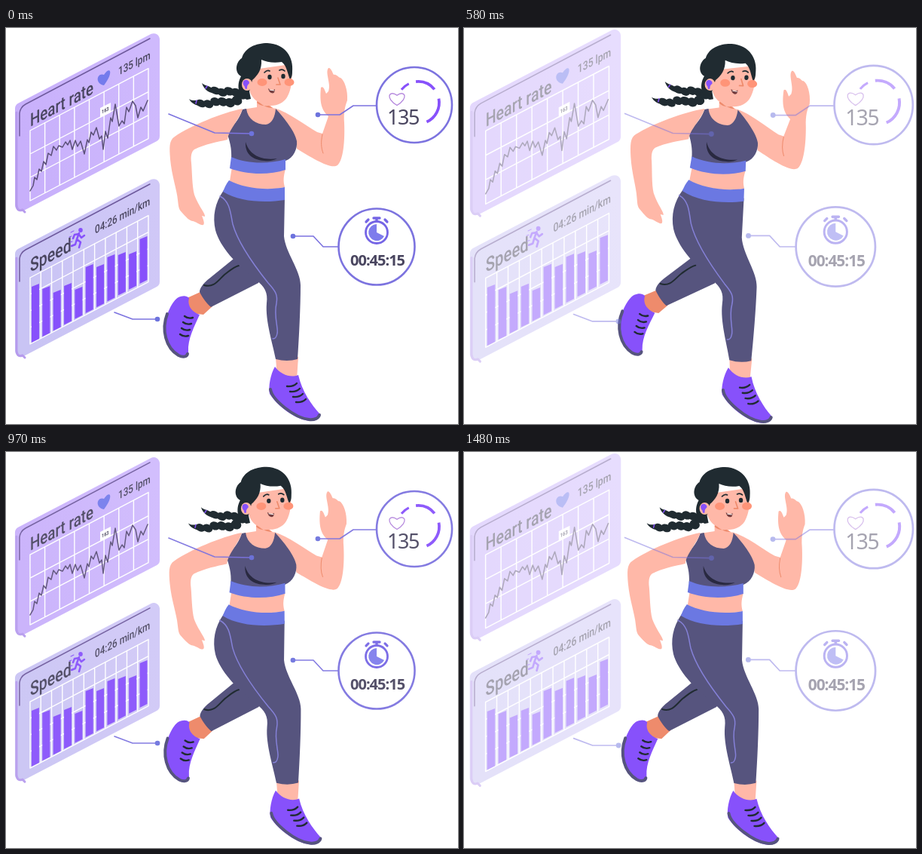
Write an HTML page with a canvas that moves like this. It is 600 px wide and 525 px high and loops after 1510 ms.

```html
<!DOCTYPE html>
<html lang="en">
<head>
<meta charset="utf-8">
<title>Runner with fitness readouts</title>
<style>
html, body { margin: 0; width: 100%; height: 100%; overflow: hidden; background: #fff; }
canvas { display: block; width: 600px; height: 525px; }
</style>
</head>
<body>
<canvas id="stage" width="600" height="525"></canvas>
<script>
const LOOP = 1510, STEP = 30, PULSE = 1000;
const SKIN = '#ffb8a8', SHADE = '#ee8b6c', CLOTH = '#56547e', BLUE = '#6b78e2',
      VIOLET = '#8751fb', HAIR = '#202b31', INK = '#49455f', LINE = '#7c73df';

const stage = document.getElementById('stage').getContext('2d');
const layer = document.createElement('canvas');
layer.width = 600;
layer.height = 525;
const overlay = layer.getContext('2d');
let g = stage;

// [time, value] pairs joined by smooth curves
const LEAN = [[-280, -.033], [0, 0], [150, .02], [390, .035], [480, .036], [700, .027],
  [970, -.007], [1120, -.026], [1230, -.033], [1480, -.001], [1660, .02]];
const FADE = [[0, 1], [150, .61], [390, .5], [500, .48], [700, .54], [970, .95],
  [1000, .97], [1120, .73], [1250, .56], [1510, .48]];

function track(keys, t) {
  let i = 0;
  while (i < keys.length - 2 && t >= keys[i + 1][0]) i++;
  const [t0, a] = keys[i], [t1, b] = keys[i + 1], span = t1 - t0;
  const slope = k => {
    const p = keys[Math.max(k - 1, 0)], q = keys[Math.min(k + 1, keys.length - 1)];
    return (q[1] - p[1]) / (q[0] - p[0]) * span;
  };
  const u = (t - t0) / span, v = 1 - u;
  return a * v * v * (1 + 2 * u) + b * u * u * (3 - 2 * u)
    + slope(i) * u * v * v - slope(i + 1) * u * u * v;
}

function fill(d, color) {
  g.fillStyle = color;
  g.fill(new Path2D(d));
}

function stroke(d, color, width = 2) {
  g.strokeStyle = color;
  g.lineWidth = width;
  g.lineCap = g.lineJoin = 'round';
  g.stroke(new Path2D(d));
}

function oval(x, y, rx, ry, color, turn = 0) {
  g.fillStyle = color;
  g.beginPath();
  g.ellipse(x, y, rx, ry, turn, 0, 7);
  g.fill();
}

function arc(x, y, r, from, to, color, width) {
  const rad = Math.PI / 180;
  g.strokeStyle = color;
  g.lineWidth = width;
  g.beginPath();
  g.arc(x, y, r, from * rad, to * rad);
  g.stroke();
}

function text(label, x, y, font, color = INK, spacing = 0) {
  g.font = font;
  g.letterSpacing = spacing + 'px';
  g.fillStyle = color;
  g.fillText(label, x, y);
}

// Draws in the tilted plane of a panel, with its origin at x, y
function tilted(x, y, draw) {
  g.save();
  g.transform(.78, -.41, 0, 1, x, y);
  draw();
  g.restore();
}

function scaled(x, y, s, draw) {
  g.save();
  g.translate(x, y);
  g.scale(s, s);
  g.translate(-x, -y);
  draw();
  g.restore();
}

function backLeg() {
  fill('M258 350L238 359L247 378L262 380L274 369Z', SHADE);
  fill('M229 357C220 362 213 380 210 394C208 410 215 428 230 436C237 438 243 435 242 429C241 412 250 396 257 380C249 377 240 370 243 358C239 354 234 355 229 357Z', VIOLET);
  stroke('M214 379C206 400 212 424 229 434C235 437 240 436 241 432', CLOTH, 4);
  for (let i = 0; i < 4; i++) {
    const x = 237 - i * 2, y = 382 + i * 8;
    stroke(`M${x} ${y}q5 4 11 2`, HAIR, 2.4);
  }
  fill('M312 298L270 332C262 338 257 345 257 350C261 358 267 366 272 370L335 338L352 310Z', CLOTH);
  stroke('M263 341C276 345 282 334 290 327C298 321 302 317 309 315', HAIR);
}

function frontLeg() {
  fill('M358 436L388 436L386 466L360 466Z', SKIN);
  fill('M357 449C351 459 348 476 350 485C360 501 385 520 404 521C415 521 419 515 416 511C406 500 393 482 388 460C378 464 365 460 357 449Z', VIOLET);
  stroke('M351 479C353 493 383 517 402 519C410 520 415 517 416 513', CLOTH, 4);
  for (let i = 0; i < 4; i++) {
    stroke(`M${373 + i * 4} ${475 + i * 7}q8 1 13 -4`, HAIR, 2.4);
  }
  fill('M289 215C277 232 274 250 278 268C284 290 305 313 332 334C343 343 348 350 346 365C344 388 354 418 358 439Q373 443 387 439C389 410 391 370 391 341C391 321 371 298 369 276L370 224Z', CLOTH);
  stroke('M284 223C298 230 298 247 301 260C307 282 328 313 348 338C358 349 361 354 359 365C355 382 362 399 360 405C359 411 357 412 354 412', '#8581d8', 1.5);
  fill('M296 202C292 207 290 212 288 217C310 231 345 232 370 228L370 211C345 216 315 212 296 202Z', BLUE);
}

function torso() {
  fill('M300 184L297 203C317 214 349 216 370 211C368 203 368 198 371 187Z', SKIN);
  fill('M333 90L333 105L314 108L300 140L340 150L378 135L357 107C351 105 350 102 350 98Z', SKIN);
  fill('M334 96C340 103 347 106 354 106L349 103C342 104 337 103 333 99Z', SHADE);
  fill('M314 108C309 123 300 131 293 138C297 150 300 160 299 174C322 183 350 181 371 176C382 172 387 160 386 150C384 138 370 120 358 107C357 118 353 127 345 128C332 128 321 121 319 107Z', CLOTH);
  fill('M318 151C317 166 326 175 343 176C350 177 356 175 360 173C340 176 323 169 318 151Z', '#292940');
  fill('M299 171C322 181 350 180 371 174L371 188C350 195 320 195 297 186Z', BLUE);
}

function leftArm() {
  fill('M314 107C287 112 244 130 224 144C216 149 217 159 218 174C220 196 227 215 228 228C229 236 229 240 233 244C239 251 244 256 248 256C253 257 258 262 262 261C264 259 262 254 260 249L264 250C265 246 256 237 250 221C247 210 247 190 246 179C245 170 246 164 250 161C264 154 281 151 294 148C296 134 307 126 314 107Z', SKIN);
}

function rightArm() {
  fill('M356 106C376 112 397 129 413 138L420 140L428 117C419 109 416 99 418 79C421 76 423 82 425 87L428 84C432 74 423 59 428 53C431 52 433 58 435 62C439 61 441 66 444 66C449 69 454 82 453 96C450 104 448 112 449 126C450 149 448 175 440 182C431 188 406 172 386 160C386 149 377 130 356 106Z', SKIN);
  stroke('M420 141C418 151 418 158 421 166', SHADE, 1);
}

function braid(x, y, dx, dy, count) {
  for (let i = 0; i < count; i++) {
    oval(x + i * dx, y + dy * i + Math.sin(i * 2) * 1.5, 7, 4.8 + i * .25, HAIR, .45);
  }
}

function head() {
  fill('M260 73C264 77 270 76 275 81L280 87C270 87 263 82 260 73Z', HAIR);
  braid(278, 83, 9, 1, 5);
  fill('M243 94C248 98 252 94 259 98L262 103C253 104 246 100 243 94Z', HAIR);
  braid(259, 100, 9.5, -.6, 6);
  stroke('M267 77L265 80M253 96L252 100', VIOLET, 1.5);

  fill('M322 56L378 48C381 67 379 82 373 92C366 103 350 107 335 98C327 94 322 85 321 70Z', SKIN);
  fill('M320 95C309 91 305 77 312 64C302 58 306 44 313 40C317 26 332 20 347 20C371 21 382 39 380 58C380 65 378 67 377 68C374 62 373 50 366 45C355 47 346 45 339 42C340 55 334 63 327 69L323 84L325 94Z', HAIR);
  oval(320, 75, 7, 8, SKIN);
  fill('M315 71C317 67 323 69 323 73C322 75 320 75 320 80C319 82 317 81 317 78C315 76 314 73 315 71Z', VIOLET);
  oval(340, 72, 6.5, 5, '#ff9478');
  oval(376, 72, 6.5, 5, '#ff9478');
  oval(350, 65, 2.7, 3.2, HAIR);
  oval(368, 64, 2.7, 3.2, HAIR);
  stroke('M343 59Q347 55 350 57M363 56Q367 54 370 57', HAIR, 1.7);
  stroke('M361 66L364 75L359 75', SHADE, 1.7);
  fill('M348 80Q353 84 357 81Q357 88 352 86Q349 85 348 80Z', '#713b3d');
  stroke('M350 82L356 83', '#fff', 1);
}

function runner(lean) {
  g.save();
  g.translate(320, 270);
  g.rotate(lean);
  g.translate(-320, -270);
  backLeg();
  rightArm();
  torso();
  frontLeg();
  leftArm();
  head();
  g.restore();
}

function panel(y, from, to) {
  const shade = g.createLinearGradient(12, y + 110, 204, y + 60);
  shade.addColorStop(0, from);
  shade.addColorStop(1, to);
  const corners = [[204, y + 2], [204, y + 148], [12, y + 248], [12, y + 102]];
  g.beginPath();
  g.moveTo(108, y + 52);
  corners.forEach((c, i) => g.arcTo(...c, ...(corners[i + 1] || [108, y + 52]), 8));
  g.closePath();
  g.fillStyle = shade;
  g.fill();
  stroke(`M14 ${y + 112}L14 ${y + 235}Q15 ${y + 244} 22 ${y + 241}L25 ${y + 244}`, '#b69bed', 3);
  stroke(`M18 ${y + 143}L18 ${y + 113}Q19 ${y + 105} 26 ${y + 101}L191 ${y + 14}`, '#6f5b9d', 1.5);
}

function grid(top, height, cols, rows) {
  let d = '';
  for (let i = 0; i <= cols; i++) {
    const x = 32 + i * 157 / cols;
    d += `M${x} ${top - (x - 32) * .525}v${height}`;
  }
  for (let i = 0; i <= rows; i++) {
    d += `M32 ${top + i * height / rows}l157 -82.4`;
  }
  stroke(d, '#fff', 1.4);
}

function heartShape(x, y, s) {
  return `M${x} ${y + 9 * s}C${x - 17 * s} ${y - s} ${x - 11 * s} ${y - 13 * s} ${x} ${y - 5 * s}`
    + `C${x + 11 * s} ${y - 13 * s} ${x + 17 * s} ${y - s} ${x} ${y + 9 * s}Z`;
}

function heartPanel() {
  panel(0, '#c8b0fb', '#cfbafd');
  grid(136, 93, 8, 3);
  stroke('M32 216L36 209L38 198L41 201L44 187L47 190L50 177L53 181L56 166L60 169L63 157L67 162L70 156L75 158L79 151L82 155L85 149L88 161L92 149L95 157L99 150L104 167L108 148L110 152L113 138L116 142L120 132L124 147L127 143L129 161L132 137L135 146L139 119L141 124L145 101L150 130L154 123L157 127L160 105L163 111L168 97L172 103L175 119L179 105L182 110L188 96', '#5b5078', 1.5);
  fill('M125 106L139 99L139 112L125 119Z', '#fff');
  tilted(127, 114, () => text('163', 0, 0, '600 7px Roboto, sans-serif'));
  tilted(32, 131, () => text('Heart rate', 0, 0, '500 24px Roboto, sans-serif'));
  tilted(149, 63, () => text('135 lpm', 0, 0, '500 15px Roboto, sans-serif'));
  tilted(130, 67, () => fill(heartShape(0, 0, 1), '#747bec'));
}

function speedPanel() {
  panel(193, '#c9c4f4', '#d0c8f7');
  grid(331, 88, 11, 4);
  [342, 345, 350, 341, 346, 316, 316, 303, 300, 299, 279].forEach((top, i) => {
    const x = 34 + i * 14.35, bottom = 417 - i * 7.8;
    fill(`M${x} ${top + 1}l10 -4V${bottom - 5}l-10 5Z`, VIOLET);
  });
  tilted(32, 324, () => text('Speed', 0, 0, '500 25px Roboto, sans-serif'));
  tilted(118, 273, () => text('04:26 min/km', 0, 0, '500 15px Roboto, sans-serif'));
  oval(99, 268, 2.8, 3, VIOLET);
  stroke('M97 272L94 280L99 284L97 291M94 280L92 287L87 289M97 273L91 274L89 279M97 274L100 278L104 275', VIOLET, 2.5);
  stroke('M86 271l4 -2M84 277l3 -1M85 284l3 -1', VIOLET, 1);
  link([[144, 377], [168, 386], [201, 386]], 2);
}

function link(points, dotAt) {
  stroke('M' + points.join('L'), LINE, 1.6);
  oval(...points[dotAt], 3.3, 3.3, '#6d73dd');
}

function pulseDial() {
  arc(542, 102, 50, 0, 360, LINE, 2.6);
  [[-142, -116], [-96, -39], [-11, 66]].forEach(([a, b], i) =>
    arc(547, 99, 28, a, b, VIOLET, i ? 3.8 : 3));
  stroke(heartShape(519, 94, .95), '#b283dc', 1.3);
  text('135', 506, 128, '27px "Noto Sans", sans-serif', INK, -1.4);
  link([[414, 115], [443, 115], [461, 103], [491, 103]], 0);
}

function timeDial() {
  arc(492, 290, 50.5, 0, 360, LINE, 2.6);
  arc(492, 271, 14.5, 0, 360, '#7565e5', 2.8);
  fill('M492 271L492 260A11 11 0 1 0 502 276Z', '#7e7cec');
  stroke('M488 252H496M492 252V256', '#7565e5', 3.4);
  stroke('M478 257L481 254M503 254L506 257', '#7565e5', 3.2);
  text('00:45:15', 457, 315, '600 20px "Noto Sans", sans-serif', INK, -1);
  link([[381, 276], [408, 276], [421, 290], [441, 290]], 0);
}

function draw(time) {
  const t = Math.floor(time % LOOP / STEP) * STEP;
  const size = 1 + .0225 * (1 - Math.cos(2 * Math.PI * t / PULSE));

  g = stage;
  g.fillStyle = '#fff';
  g.fillRect(0, 0, 600, 525);
  runner(track(LEAN, t));

  // Readouts share one layer so that they fade as a group
  g = overlay;
  g.clearRect(0, 0, 600, 525);
  scaled(108, 126, size, heartPanel);
  scaled(108, 318, size, speedPanel);
  scaled(271, 127, size, () => link([[216, 114], [277, 139], [326, 140]], 2));
  scaled(503, 102, size, pulseDial);
  scaled(462, 290, size, timeDial);

  stage.globalAlpha = track(FADE, t);
  stage.drawImage(layer, 0, 0);
  stage.globalAlpha = 1;
}

const start = performance.now();
function tick() {
  draw(performance.now() - start);
  requestAnimationFrame(tick);
}
tick();
</script>
</body>
</html>
```
